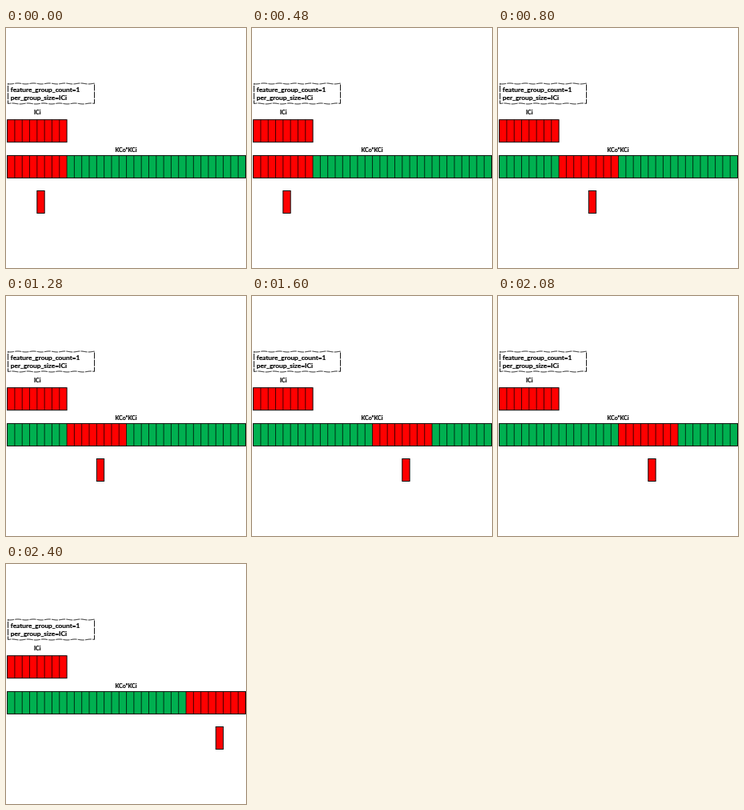
Animation of 300 by 300 pixels, one loop 3200 ms. Source, as an HTML page with a canvas:

```html
<!DOCTYPE html>
<html lang="en">
<head>
<meta charset="utf-8">
<title>Grouped channels</title>
<style>
  html, body { margin: 0; width: 100%; height: 100%; overflow: hidden; background: #fff; }
  canvas { display: block; width: 300px; height: 300px; }
</style>
</head>
<body>
<canvas id="stage"></canvas>
<script>
const STEP_MS = 800, GROUPS = 4, GROUP_SIZE = 8, CELLS = GROUPS * GROUP_SIZE;
const LEFT = 1.6, PITCH = 9.31, BAR_HEIGHT = 28;
const RED = '#ff0000', GREEN = '#00b050';

const canvas = document.getElementById('stage');
const ctx = canvas.getContext('2d');
const ratio = window.devicePixelRatio || 1;
canvas.width = canvas.height = 300 * ratio;
ctx.scale(ratio, ratio);

const cellX = index => LEFT + index * PITCH;

function fillCells(first, count, y, color) {
  ctx.fillStyle = color;
  ctx.fillRect(cellX(first), y, count * PITCH, BAR_HEIGHT);
}

function outlineCells(first, count, y) {
  ctx.strokeStyle = '#000';
  ctx.lineWidth = 0.95;
  ctx.strokeRect(cellX(first), y, count * PITCH, BAR_HEIGHT);
  ctx.lineWidth = 0.75;
  ctx.beginPath();
  for (let i = first + 1; i < first + count; i++) {
    ctx.moveTo(cellX(i), y);
    ctx.lineTo(cellX(i), y + BAR_HEIGHT);
  }
  ctx.stroke();
}

function drawText(text, x, y, size, align = 'left') {
  ctx.font = `bold ${size}px Lato, Carlito, sans-serif`;
  ctx.textAlign = align;
  ctx.fillStyle = ctx.strokeStyle = '#000';
  ctx.lineWidth = 0.2;
  ctx.fillText(text, x, y);
  ctx.strokeText(text, x, y);
}

function drawNote() {
  const left = 2.5, right = 110.5, top = 69.5, bottom = 94.5;
  const wave = x => 0.5 * Math.sin(x * 0.32);
  ctx.beginPath();
  ctx.moveTo(left, top);
  for (let x = left; x <= right; x++) ctx.lineTo(x, top + wave(x));
  for (let x = right; x >= left; x--) ctx.lineTo(x, bottom + wave(x + 7));
  ctx.closePath();
  ctx.strokeStyle = '#000';
  ctx.lineWidth = 0.9;
  ctx.setLineDash([8, 1.2]);
  ctx.stroke();
  ctx.setLineDash([]);
  drawText('feature_group_count=1', 5.8, 79.5, 8.3);
  drawText('per_group_size=ICi', 5.8, 90, 8.3);
}

function draw(now) {
  const group = Math.floor(now / STEP_MS) % GROUPS;
  const start = group * GROUP_SIZE;
  ctx.fillStyle = '#fff';
  ctx.fillRect(0, 0, 300, 300);
  drawNote();

  drawText('ICi', 39.2, 108, 6.9, 'center');
  fillCells(0, GROUP_SIZE, 114.7, RED);
  outlineCells(0, GROUP_SIZE, 114.7);

  drawText('KCo*KCi', 150, 155, 7, 'center');
  fillCells(0, CELLS, 159.4, GREEN);
  fillCells(start, GROUP_SIZE, 159.4, RED);
  outlineCells(0, CELLS, 159.4);

  fillCells(start + 4, 1, 203.5, RED);
  outlineCells(start + 4, 1, 203.5);
}

let origin;
function tick(now) {
  origin ??= now;
  draw(now - origin);
  requestAnimationFrame(tick);
}
draw(0);
requestAnimationFrame(tick);
</script>
</body>
</html>
```
